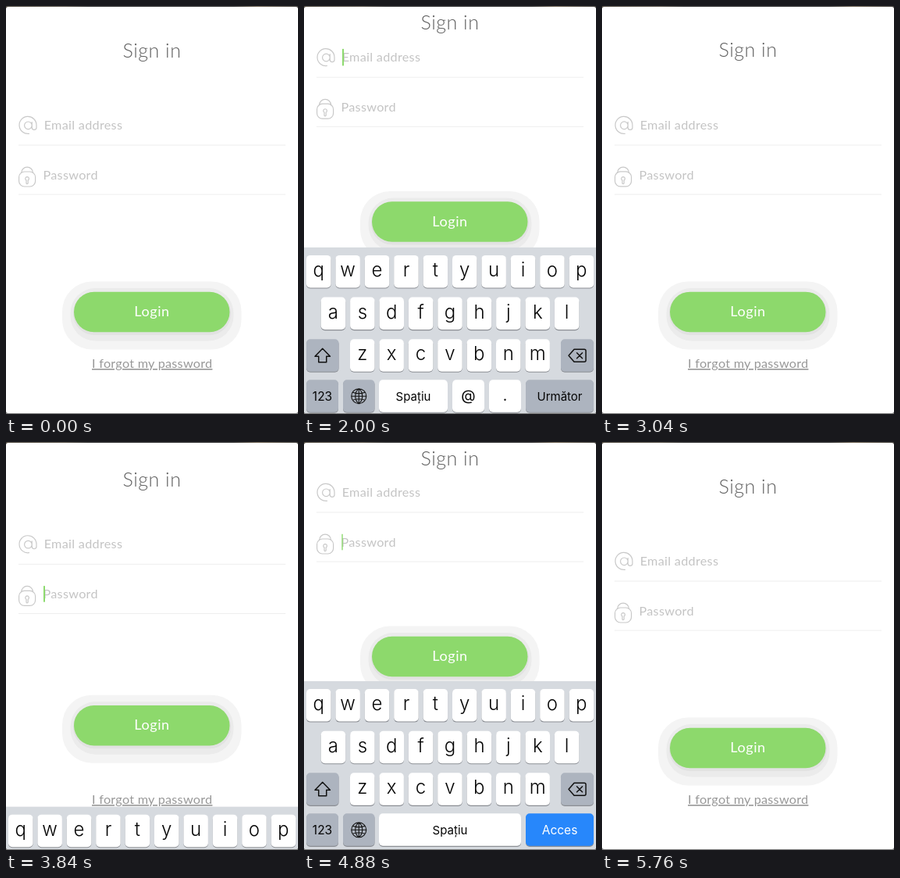
An HTML page that plays this animation: 374 px wide and 522 px high, repeating every 6.88 s.

```html
<!DOCTYPE html>
<html lang="en">
<head>
<meta charset="utf-8">
<title>Sign in form</title>
<style>
  html, body { margin: 0; width: 100%; height: 100%; overflow: hidden; background: #fff; }
  svg { display: block; width: 100%; height: 100%; }
  text { font-family: Lato, "Open Sans", sans-serif; }
  .hint { font-size: 16.2px; letter-spacing: .3px; fill: #c4c4c4; }
  .rule { fill: #eeeeee; }
  .icon { fill: none; stroke: #c9c9c9; stroke-width: 1.2; stroke-linecap: round; }
  .caret { fill: #8dda6e; }
  #keys text { font-family: Inter, Roboto, sans-serif; text-anchor: middle; fill: #050505; }
  #keys .letter { font-size: 24px; font-weight: 300; }
  #keys .glyph { fill: none; stroke: #111; stroke-width: 1.5; stroke-linejoin: round; stroke-linecap: round; }
  #keys .thin { stroke-width: 1.1; }
</style>
</head>
<body>
<svg viewBox="0 0 374 522">
  <defs>
    <linearGradient id="strip">
      <stop offset="0" stop-color="#4c463c"/>
      <stop offset=".2" stop-color="#544e44"/>
      <stop offset=".28" stop-color="#303030"/>
      <stop offset=".78" stop-color="#303030"/>
      <stop offset=".86" stop-color="#6a5e4c"/>
      <stop offset="1" stop-color="#3c3a36"/>
    </linearGradient>
    <clipPath id="screen"><rect y="1" width="374" height="520" rx="3"/></clipPath>
  </defs>
  <rect width="374" height="522" fill="#777"/>
  <rect width="374" height="8" fill="url(#strip)"/>
  <g clip-path="url(#screen)">
    <rect y="1" width="374" height="521" fill="#fff"/>

    <text x="110" y="463" font-size="16.2" letter-spacing=".27" fill="#989898" text-decoration="underline">I forgot my password</text>

    <g id="title">
      <text x="187" y="65.5" font-size="25" font-weight="300" letter-spacing=".5" text-anchor="middle" fill="#606060">Sign in</text>
    </g>

    <g id="fields">
      <path class="icon" d="M29.5 163.3A11 11 0 1 1 39 152.5V155.5a2.9 2.9 0 0 1-5.8 0V148.5M33.2 152.8a4.8 4.8 0 1 1-9.6 0a4.8 4.8 0 1 1 9.6 0"/>
      <text class="hint" x="48.7" y="158">Email address</text>
      <rect class="rule" x="16" y="177.5" width="342" height="1"/>
      <rect class="caret" id="emailCaret" x="49" y="141.7" width="2" height="21.5"/>

      <g class="icon">
        <rect x="16.6" y="212" width="21" height="19" rx="7"/>
        <path d="M19.7 213.5a7.4 7.4 0 0 1 14.8 0"/>
        <path d="M26 222.9a2.3 2.3 0 1 1 2.2 0V226.5a1.1 1.1 0 0 1-2.2 0Z"/>
      </g>
      <text class="hint" x="47.5" y="221.7">Password</text>
      <rect class="rule" x="16" y="240.6" width="342" height="1"/>
      <rect class="caret" id="passCaret" x="48" y="205.8" width="2" height="20.5"/>
    </g>

    <g id="login">
      <rect x="72" y="352.5" width="229.5" height="87" rx="38" fill="#f4f4f4"/>
      <rect x="82.5" y="361" width="209" height="67.5" rx="32" fill="#ebebeb"/>
      <rect x="86" y="366" width="202" height="55" rx="27" fill="#e2e2e2"/>
      <rect x="87" y="365.7" width="199.5" height="51.5" rx="25.7" fill="#8dd96c"/>
      <text x="187" y="397" font-size="18" letter-spacing=".6" text-anchor="middle" fill="#fff">Login</text>
    </g>

    <g id="keys"><rect width="374" height="230" fill="#d6dadf"/></g>
  </g>
</svg>
<script>
const LOOP = 6880, STEP = 80;
const SPRING = 0.019;   // per ms, critically damped
const KEYS_SHUT = 519, KEYS_RISE = 213;
const $ = id => document.getElementById(id);

const sessions = [
  { start: 1760, open: 1669, end: 2560, close: 2503, caret: "emailCaret", set: "nextKeys" },
  { start: 3840, open: 3790, end: 5040, close: 4983, caret: "passCaret", set: "goKeys" }
];
const lifts = { title: 35.5, fields: 88, login: 117 };

function add(parent, tag, attrs, text) {
  const el = document.createElementNS("http://www.w3.org/2000/svg", tag);
  for (const name in attrs) el.setAttribute(name, attrs[name]);
  if (text) el.textContent = text;
  return parent.appendChild(el);
}

function key(parent, x, y, width, fill = "#fff") {
  const box = { x, width, height: 41.5, rx: 5 };
  add(parent, "rect", { ...box, y: y + 1.1, fill: "#8b8e94" });
  add(parent, "rect", { ...box, y, fill });
}

function labelKey(parent, x, width, label, size, fill, ink = "#050505") {
  key(parent, x, ROW4, width, fill);
  add(parent, "text", { x: x + width / 2, y: ROW4 + 26.5, "font-size": size, style: `fill:${ink}` }, label);
}

function glyphKey(x, y, width, d, style = "glyph") {
  key(keys, x, y, width, GREY);
  add(keys, "path", { class: style, d, transform: `translate(${x + width / 2} ${y + 21})` });
}

const keys = $("keys"), GREY = "#adb4bf", ROW3 = 117.3, ROW4 = 169.3;

[["qwertyuiop", 3, 10], ["asdfghjkl", 21.7, 63.7], ["zxcvbnm", 59, ROW3]].forEach(([letters, left, y]) =>
  [...letters].forEach((letter, i) => {
    const x = left + i * 37.4;
    key(keys, x, y, 31.5);
    add(keys, "text", { class: "letter", x: x + 15.75, y: y + 27 }, letter);
  }));

glyphKey(3, ROW3, 41.5, "M0-9L-9.7 1H-5V8.5H5V1H9.7Z");
glyphKey(329, ROW3, 42, "M-11 0L-4-8H9Q11-8 11-6V6Q11 8 9 8H-4ZM-.5-3.5L6.5 3.5M6.5-3.5L-.5 3.5");
glyphKey(50, ROW4, 40.5,
  "M-9.5 0a9.5 9.5 0 1 1 19 0a9.5 9.5 0 1 1-19 0H9.5M0-9.5V9.5M0-9.5C-6-5-6 5 0 9.5C6 5 6-5 0-9.5M-8-5Q0-2 8-5M-8 5Q0 2 8 5",
  "glyph thin");
labelKey(keys, 3, 41, "123", 15.5, GREY);

const nextKeys = add(keys, "g", { id: "nextKeys" });
labelKey(nextKeys, 96, 88, "Spațiu", 15);
labelKey(nextKeys, 190, 41, "@", 19);
labelKey(nextKeys, 237, 41, ".", 19);
labelKey(nextKeys, 284, 87, "Următor", 15, GREY);

const goKeys = add(keys, "g", { id: "goKeys" });
labelKey(goKeys, 96, 182, "Spațiu", 15);
labelKey(goKeys, 284, 87, "Acces", 15.5, "#2787fb", "#fff");

function settle(ms) {
  const x = Math.max(0, ms) * SPRING;
  return 1 - Math.exp(-x) * (1 + x);
}

function progress(t, s) {
  if (t < s.start) return 0;
  return t < s.end ? settle(t - s.open) : 1 - settle(t - s.close);
}

function caretOpacity(t, s) {
  if (t < s.start || t >= s.end) return 0;
  const blink = s.start + 880;
  return t < blink ? 1 : Math.max(0.7, 0.9 - (t - blink) / 800);
}

const shift = (id, y) => $(id).setAttribute("transform", `translate(0 ${y.toFixed(2)})`);

function draw(time) {
  const t = Math.floor((time % LOOP) / STEP) * STEP;
  const current = sessions[t < sessions[1].start ? 0 : 1];
  const p = progress(t, current);
  for (const id in lifts) shift(id, -lifts[id] * p);
  shift("keys", p < 0.002 ? 530 : KEYS_SHUT - KEYS_RISE * p);
  for (const s of sessions) {
    $(s.caret).setAttribute("opacity", caretOpacity(t, s));
    $(s.set).setAttribute("visibility", s === current ? "visible" : "hidden");
  }
}

const began = performance.now();
function tick() {
  draw(performance.now() - began);
  requestAnimationFrame(tick);
}
tick();
</script>
</body>
</html>
```
